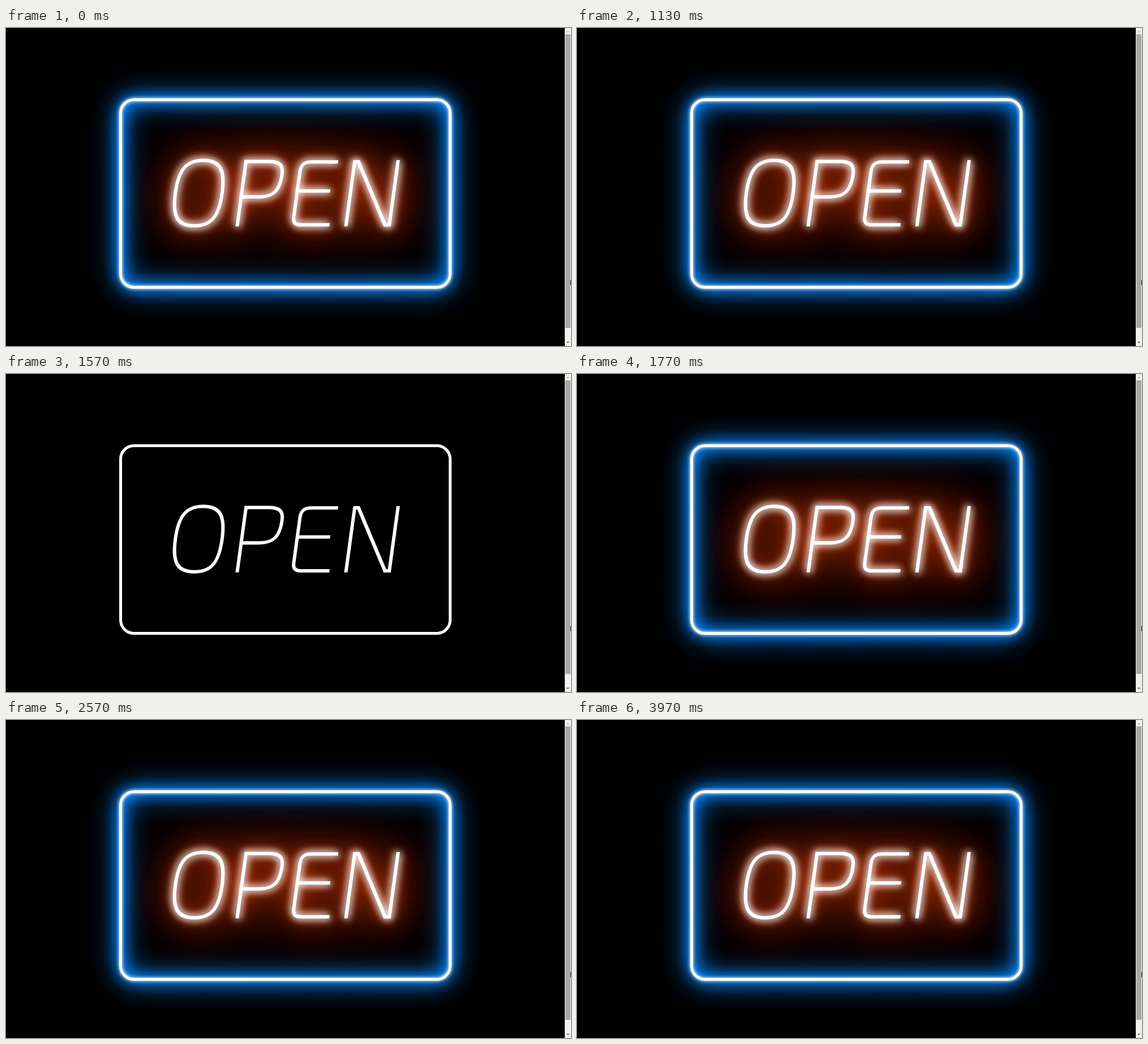
An HTML page with a canvas that plays this animation: 998 by 561 pixels, repeating every 4010 ms.

```html
<!DOCTYPE html>
<html lang="en">
<head>
<meta charset="utf-8">
<title>Neon sign</title>
<style>
  html, body { margin: 0; width: 100%; height: 100%; overflow: hidden; background: #000; }
  #frame {
    position: absolute; left: 200px; top: 123.6px; width: 587px; height: 336.4px;
    box-sizing: border-box; border: 5.2px solid #fff; border-radius: 26px;
  }
  canvas, svg { position: absolute; top: 0; }
  canvas { left: 0; }
  svg { left: 987px; }
</style>
</head>
<body>
<div id="frame"></div>
<canvas id="sign" width="987" height="561" role="img" aria-label="OPEN"></canvas>
<svg width="11" height="561">
  <path fill="#f1f1f1" d="M0 0H11V561H0Z"/>
  <path fill="#a8a8a8" d="M1 11H10V529H1Z"/>
  <path fill="#a3a3a3" d="M3 7.5L5.5 5L8 7.5Z"/>
  <path fill="#505050" d="M3 553.5L5.5 556L8 553.5Z"/>
  <path fill="#222" d="M10 444L11 445V453L10 454Z"/>
</svg>
<script>
const LOOP = 4010;
const REM = 13;
const BASELINE = 350;
const SLANT = 0.137;
const FAR = 2000; // moves the letters out of view so that only their shadow shows

const WHITE = '255,255,255', ORANGE = '255,68,0', BLUE = '0,136,255';

// [offset, blur, colour], topmost first, in rem
const textGlow = [
  [-0.2, 1, WHITE], [0.2, 1, WHITE],
  ...[2, 4, 6, 8, 10].map(blur => [0, blur, ORANGE])
];
const frameGlow = [[0.5, WHITE], [2, BLUE], [4, BLUE]];

// [start, end, brightness]
const flickers = [
  [1100, 1130, 0.5],
  [1570, 1630, 0],
  [1630, 1660, 0.5],
  [2170, 2230, 0.06],
  [2230, 2260, 0.5],
  [2700, 2730, 0.97]
];

function oval(cx, cy, rx, ry, k) {
  const arc = (x1, y1, x2, y2, x3, y3) =>
    `C${cx + x1 * rx} ${cy + y1 * ry} ${cx + x2 * rx} ${cy + y2 * ry} ${cx + x3 * rx} ${cy + y3 * ry}`;
  return `M${cx} ${cy - ry}` + arc(k, -1, 1, -k, 1, 0) + arc(1, k, k, 1, 0, 1) +
    arc(-k, 1, -1, k, -1, 0) + arc(-1, -k, -k, -1, 0, -1) + 'Z';
}

// Upright centre lines; the canvas transform slants them.
const letters = new Path2D([
  oval(332.4, 291.3, 41.3, 57.7, 0.72),
  'M408.3 350V235.5H448C468 235.5 475 242 475 258C475 287 465 298 440 298H408.3',
  'M571 236.3H524C511 236.3 506 241 506 254V333C506 343 510 347.2 520 347.2H571M506 287.5H564',
  'M600.3 350V236H607L669 347.2H676.7V233'
].join(''));

const frame = document.getElementById('frame');
const ctx = document.getElementById('sign').getContext('2d');

function strokeLetters(shift) {
  ctx.setTransform(1, 0, -SLANT, 1, BASELINE * SLANT + shift, 0);
  ctx.stroke(letters);
}

function draw(level) {
  const tint = rgb => `rgba(${rgb},${level})`;
  frame.style.boxShadow = frameGlow.flatMap(([blur, rgb]) => {
    const shadow = `0 0 ${blur * REM * level}px ${tint(rgb)}`;
    return [shadow, 'inset ' + shadow];
  }).join();

  ctx.resetTransform();
  ctx.clearRect(0, 0, 987, 561);
  ctx.strokeStyle = '#fff';
  ctx.lineWidth = 6;
  if (level) {
    for (const [offset, blur, rgb] of [...textGlow].reverse()) {
      ctx.shadowColor = tint(rgb);
      ctx.shadowBlur = blur * REM * level;
      ctx.shadowOffsetX = FAR + offset * REM * level;
      ctx.shadowOffsetY = offset * REM * level;
      strokeLetters(-FAR);
    }
  }
  ctx.shadowColor = 'transparent';
  strokeLetters(0);
}

let shown;
function tick() {
  const time = performance.now() % LOOP;
  const flicker = flickers.find(([start, end]) => time >= start && time < end);
  const level = flicker ? flicker[2] : 1;
  if (level !== shown) draw(shown = level);
  requestAnimationFrame(tick);
}
tick();
</script>
</body>
</html>
```
